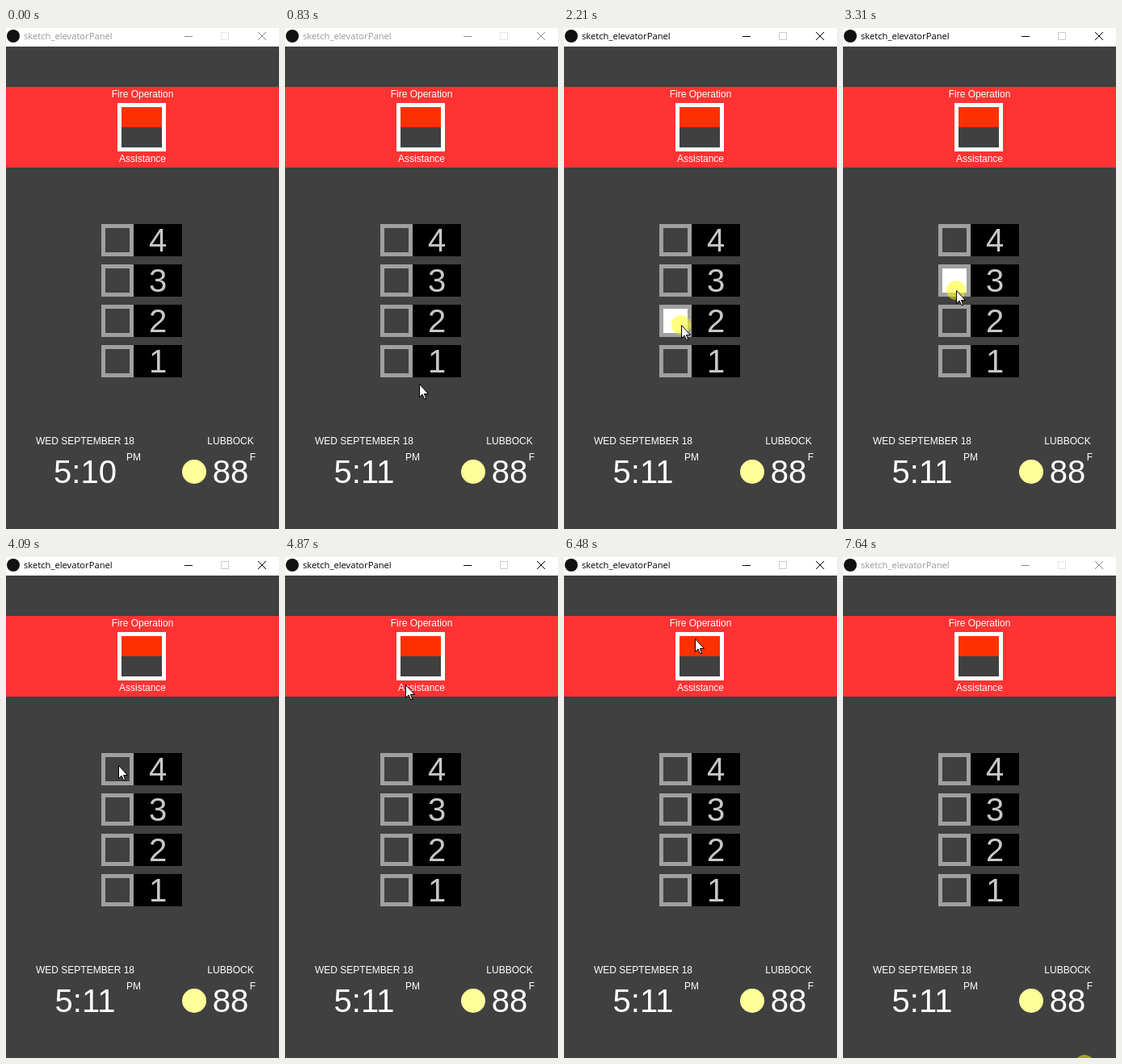
An HTML page with a canvas for the animation above (7.72 s loop, 338 px wide and 621 px high).

```html
<!DOCTYPE html>
<html lang="en">
<head>
<meta charset="utf-8">
<title>Elevator panel</title>
<style>
  html, body { margin: 0; height: 100%; overflow: hidden; background: #404040; }
  canvas { display: block; }
</style>
</head>
<body>
<canvas id="stage" width="338" height="621"></canvas>
<script>
const ctx = document.getElementById('stage').getContext('2d');
const LOOP = 7720, STEP = 76.7;
const FOCUS = 1130, BLUR = 7640, MINUTE = 750, ENTER = 440;

// pointer moves: start time, number of steps, target x, target y
const moves = [
  [440, 9, 148, 408], [1680, 3, 145, 368], [2700, 4, 140, 325],
  [3780, 6, 139, 255], [4640, 4, 149, 158], [4950, 2, 158, 138],
  [5710, 3, 162, 101], [6800, 9, 288, 608], [7490, 1, 299, 629]
];
// presses: from, to, pressed button
const presses = [
  [1130, 1360, '1'], [2210, 2380, '2'], [3310, 3630, '3'], [4240, 4560, '4'],
  [5100, 5480, 'assist'], [6170, 6480, 'fire'], [7640, 7720, 'outside']
];

function rect(x, y, w, h, color) {
  ctx.fillStyle = color;
  ctx.fillRect(x, y, w, h);
}

function disc(x, y, r, color) {
  ctx.fillStyle = color;
  ctx.beginPath();
  ctx.arc(x, y, r, 0, 2 * Math.PI);
  ctx.fill();
}

function text(str, x, y, size = 12, color = '#fff') {
  ctx.font = size + 'px "Liberation Sans", Arial, sans-serif';
  ctx.textAlign = 'center';
  ctx.fillStyle = color;
  ctx.fillText(str, x, y);
}

function line(color, ...points) {
  ctx.strokeStyle = color;
  ctx.lineWidth = 1;
  ctx.beginPath();
  points.forEach(([x, y]) => ctx.lineTo(x, y));
  ctx.stroke();
}

function pointerAt(t) {
  let x = 265, y = 622;
  for (const [start, steps, toX, toY] of moves) {
    if (t < start) break;
    const step = Math.min(steps, Math.floor((t - start + 5) / STEP) + 1);
    const p = (step / steps) ** 0.7;
    const e = p * p * (3 - 2 * p);
    x += (toX - x) * e;
    y += (toY - y) * e;
  }
  return [Math.round(x), Math.round(y)];
}

function drawTitle(active) {
  const ink = active ? '#000' : '#888';
  rect(0, 0, 338, 23, '#fff');
  disc(9, 10, 8, '#111');
  ctx.font = '11.2px "Open Sans", "Noto Sans", sans-serif';
  ctx.textAlign = 'left';
  ctx.fillStyle = active ? '#000' : '#999';
  ctx.fillText('sketch_elevatorPanel', 22, 14);
  line(ink, [221, 10.5], [231, 10.5]);
  ctx.strokeStyle = active ? '#ccc' : '#e4e4e4';
  ctx.strokeRect(266.5, 5.5, 9, 9);
  line(ink, [312, 5], [322, 15]);
  line(ink, [322, 5], [312, 15]);
}

function drawPanel(pressed, time) {
  rect(0, 73, 338, 100, '#ff3333');
  rect(138, 93, 60, 60, '#fff');
  rect(143, 98, 50, 25, pressed === 'fire' ? '#fff' : '#ff3000');
  rect(143, 123, 50, 25, pressed === 'assist' ? '#fff' : '#404040');
  text('Fire Operation', 169, 86);
  text('Assistance', 169, 166);

  ['4', '3', '2', '1'].forEach((floor, i) => {
    const y = 243 + 50 * i;
    rect(118, y, 40, 40, '#a0a0a0');
    rect(123, y + 5, 30, 30, pressed === floor ? '#fff' : '#404040');
    rect(158, y, 60, 40, '#000');
    text(floor, 188, y + 34, 40, '#c8c8c8');
  });

  text('WED SEPTEMBER 18', 98, 516);
  text(time, 98, 564, 40);
  text('PM', 158, 536);
  text('LUBBOCK', 278, 516);
  disc(233, 550, 15, '#ffff99');
  text('88', 278, 564, 40);
  text('F', 305.5, 536);
}

function drawPointer(x, y) {
  ctx.save();
  ctx.translate(x + 0.5, y + 0.5);
  const arrow = new Path2D('M0 0V16L3.6 12.6L6 18H8.3L6 12H11Z');
  ctx.fillStyle = '#fff';
  ctx.fill(arrow);
  ctx.strokeStyle = '#000';
  ctx.lineWidth = 1;
  ctx.stroke(arrow);
  ctx.restore();
}

function draw(t) {
  const press = presses.find(([from, to]) => t >= from && t < to);
  rect(0, 0, 338, 621, '#404040');
  drawTitle(t >= FOCUS && t < BLUR);
  drawPanel(press && press[2], t < MINUTE ? '5:10' : '5:11');
  if (t < ENTER) return;
  const [x, y] = pointerAt(t);
  if (press) disc(x, y, 12, 'rgba(255, 255, 0, 0.5)');
  drawPointer(x, y);
}

const begin = performance.now();
function frame() {
  draw((performance.now() - begin) % LOOP);
  requestAnimationFrame(frame);
}
frame();
</script>
</body>
</html>
```
